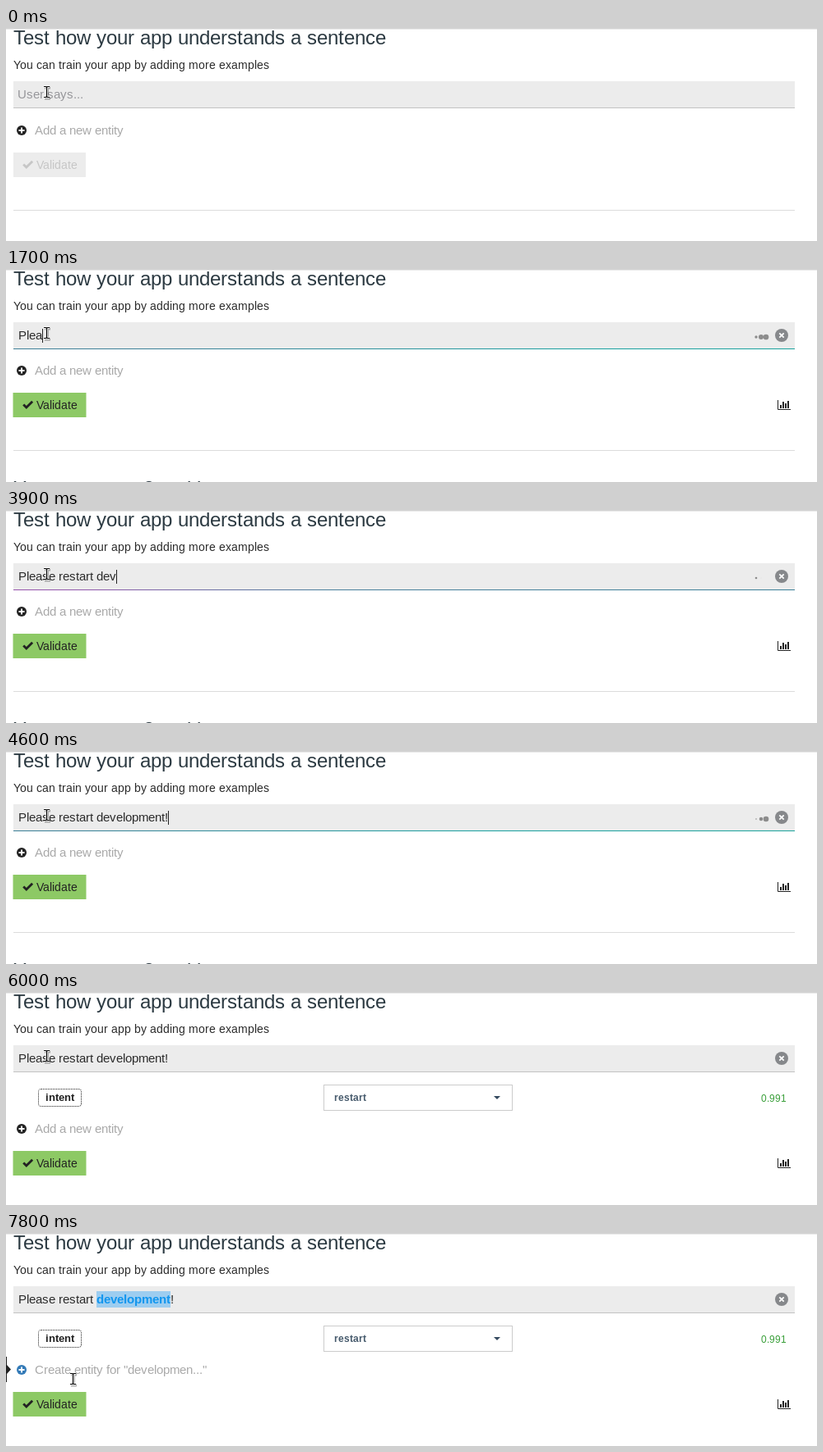
Animation, 986 px wide and 260 px high, one loop 8000 ms. Source, as an HTML page with a canvas:

```html
<!DOCTYPE html>
<html lang="en">
<head>
<meta charset="utf-8">
<title>Sentence tester</title>
<style>
  html, body { margin: 0; width: 100%; height: 100%; overflow: hidden; background: #fff; }
  canvas { display: block; }
  #chip {
    position: absolute; left: 39px; top: 118px; width: 53px; height: 22px;
    box-sizing: border-box; border: 1px dotted #222; border-radius: 4px;
  }
</style>
</head>
<body>
<canvas id="stage" width="986" height="260"></canvas>
<div id="chip" hidden></div>
<script>
const ctx = document.getElementById('stage').getContext('2d');
const chip = document.getElementById('chip');
const LOOP = 8000, STEP = 100;
const SENTENCE = 'Please restart development!';
const FOCUS = 400, TYPING = 1100, ENABLED = 1200, TYPED = 4500, RESULT = 6000, SELECTED = 6700, HOVER = 7300;

const typingKeys = [[TYPING, 1], [2600, 10], [3900, 18], [TYPED, 27]];
const pointerKeys = [[RESULT, 50, 78], [6400, 134, 71], [6500, 144, 73], [SELECTED, 144, 73],
  [7500, 86, 182], [7600, 86, 190], [7800, 82, 178]];

// Linear interpolation over rows of [time, ...values].
function track(keys, t) {
  if (t <= keys[0][0]) return keys[0].slice(1);
  const next = keys.findIndex(key => key[0] > t);
  if (next < 0) return keys[keys.length - 1].slice(1);
  const a = keys[next - 1], b = keys[next];
  const p = (t - a[0]) / (b[0] - a[0]);
  return a.slice(1).map((v, i) => v + (b[i + 1] - v) * p);
}

// Lays glyphs out on whole pixels, as hinted text does.
function layout(str, size, bold) {
  ctx.font = `${bold ? 'bold ' : ''}${size}px "Liberation Sans", Arial, sans-serif`;
  const measure = s => ctx.measureText(s).width;
  let x = 0;
  const glyphs = [...str].map((char, i) => {
    const glyph = { char, x }, next = str[i + 1] || '';
    const kerning = measure(char + next) - measure(char) - measure(next);
    x += Math.round(measure(char)) + Math.round(kerning);
    return glyph;
  });
  return { glyphs, width: x };
}

function text(str, x, y, size, color, bold) {
  const { glyphs, width } = layout(str, size, bold);
  ctx.fillStyle = color;
  glyphs.forEach(glyph => ctx.fillText(glyph.char, x + glyph.x, y));
  return width;
}

function rect(x, y, w, h, color) {
  ctx.fillStyle = color;
  ctx.fillRect(x, y, w, h);
}

function circle(x, y, r, color) {
  ctx.fillStyle = color;
  ctx.beginPath();
  ctx.arc(x, y, r, 0, Math.PI * 2);
  ctx.fill();
}

function fill(path, color) {
  ctx.fillStyle = color;
  ctx.fill(new Path2D(path));
}

function stroke(path, color, width) {
  ctx.strokeStyle = color;
  ctx.lineWidth = width;
  ctx.stroke(new Path2D(path));
}

function at(x, y, draw) {
  ctx.save();
  ctx.translate(x, y);
  draw();
  ctx.restore();
}

function drawLoader(t) {
  const span = 950;
  const phase = (t - TYPING + 100) % 2800 / 1400;
  const left = 9 - 2 * span * (1 - Math.abs(1 - phase));
  const gradient = ctx.createLinearGradient(left, 0, left + 3 * span, 0);
  [[0, '#a34fae'], [0.08, '#8f58ab'], [0.18, '#4a7f9c'], [0.4, '#3a7f97'],
   [0.58, '#17a09f'], [0.88, '#1fa595'], [1, '#62b25f']]
    .forEach(([p, color]) => gradient.addColorStop(p, color));
  rect(9, 97, span, 1, gradient);

  for (let i = 0; i < 3; i++) {
    const p = (t - 860 - i * 160 + 1400) % 1400 / 560;
    const scale = p < 2 ? (1 - Math.cos(Math.PI * p)) / 2 : 0;
    circle(912 + i * 6, 83, 3.4 * scale, '#8c8c8c');
  }
}

function drawInput(t) {
  rect(9, 65, 950, 32, '#ececec');
  rect(9, 97, 950, 1, '#c3c3c3');
  if (t < TYPING) {
    text('User says...', 14, 86, 15, t < FOCUS ? '#97979b' : '#bdc1c9');
    if (t >= FOCUS) rect(15, 73, 1, 17, '#222');
    return;
  }

  if (t < SELECTED) {
    const typed = SENTENCE.slice(0, Math.floor(track(typingKeys, t)[0] + 1e-6));
    const width = text(typed, 15, 86, 15, '#2b2b2b');
    const caretOn = t < TYPED || Math.floor((t - TYPED) / 500) % 2 === 0;
    if (caretOn) rect(15 + width, 73, 1, 17, '#222');
  } else {
    const [, before, word, after] = SENTENCE.match(/(.* )(\w+)(!)/);
    const x = 15 + text(before, 15, 86, 15, '#2b2b2b');
    const { width } = layout(word, 15, true);
    rect(x, 71, width, 20, '#9dcdf0');
    text(word, x, 86, 15, '#1296ee', true);
    text(after, x + width, 86, 15, '#2b2b2b');
  }

  if (t < RESULT) drawLoader(t);
  circle(943, 81, 8, '#86888b');
  stroke('M940.3 78.3l5.4 5.4M945.7 78.3l-5.4 5.4', '#fff', 1.7);
}

function drawResult() {
  text('intent', 48, 133, 13, '#222', true);
  ctx.strokeStyle = '#ccc';
  ctx.lineWidth = 1;
  ctx.strokeRect(386.5, 113.5, 229, 31);
  text('restart', 399, 133, 12, '#465a6c', true);
  fill('M593 127h8l-4 4z', '#34495e');
  text('0.991', 949 - layout('0.991', 12).width, 134, 12, '#3a9f3a');
}

function drawActions(t) {
  const hovered = t >= HOVER, enabled = t >= ENABLED;
  circle(19, 124, 6, hovered ? '#337ab7' : '#222');
  stroke('M15.5 124h7M19 120.5v7', '#fff', 1.9);
  text(t < SELECTED ? 'Add a new entity' : 'Create entity for "developmen..."', 35, 129, 15, '#a9a9a9');

  if (enabled) rect(8.5, 151, 89, 30, '#8dc965');
  else rect(9, 151, 88, 30, '#ececec');
  const ink = enabled ? '#222' : '#c6c6c6';
  fill('M20.2 166.5l2-2 2.6 2.6 6.3-6.3 2 2-8.3 8.3z', ink);
  text('Validate', 37, 171, 14, ink);

  if (t >= TYPING) {
    stroke('M938.5 160v11.5H954', '#222', 1);
    [[941, 4], [944, 8], [947, 6], [950, 9]].forEach(([x, h]) => rect(x, 170 - h, 2, h, '#222'));
    text('Your app uses 2 entities', 9, 276, 24, '#2c3a42');
  }
  rect(9, 221, 950, 1, '#dcdcdc');
}

function drawPointer(x, y) {
  const beam = 'M-3 -6.5h2q1 0 1.5 1q.5 -1 1.5 -1h2M.5 -5.5v11M-3 6.5h2q1 0 1.5 -1q.5 1 1.5 1h2';
  at(Math.round(x) - 1, Math.round(y), () => {
    at(1, 1.5, () => stroke(beam, 'rgba(0,0,0,.3)', 3));
    stroke(beam, '#fff', 2.6);
    stroke(beam, '#000', 1.2);
  });
}

function draw(t) {
  rect(0, 0, 986, 260, '#fff');
  rect(0, 0, 986, 1, '#d2d2d2');
  rect(0, 1, 986, 1, '#ebebeb');
  text('Test how your app understands a sentence', 9, 20, 24, '#2c3a42');
  text('You can train your app by adding more examples', 9, 50, 14, '#2b2b2b');
  drawInput(t);
  chip.hidden = t < RESULT;
  if (t >= RESULT) drawResult();
  at(0, t < TYPING ? 1 : t < RESULT ? 0 : 43, () => drawActions(t));
  if (t >= HOVER) fill('M0 151h1v10l5 5.5-5 5.5v10H0z', '#222');
  drawPointer(...track(pointerKeys, t));
}

function tick() {
  const t = performance.now() % LOOP;
  draw(Math.floor(t / STEP) * STEP);
  requestAnimationFrame(tick);
}
tick();
</script>
</body>
</html>
```
